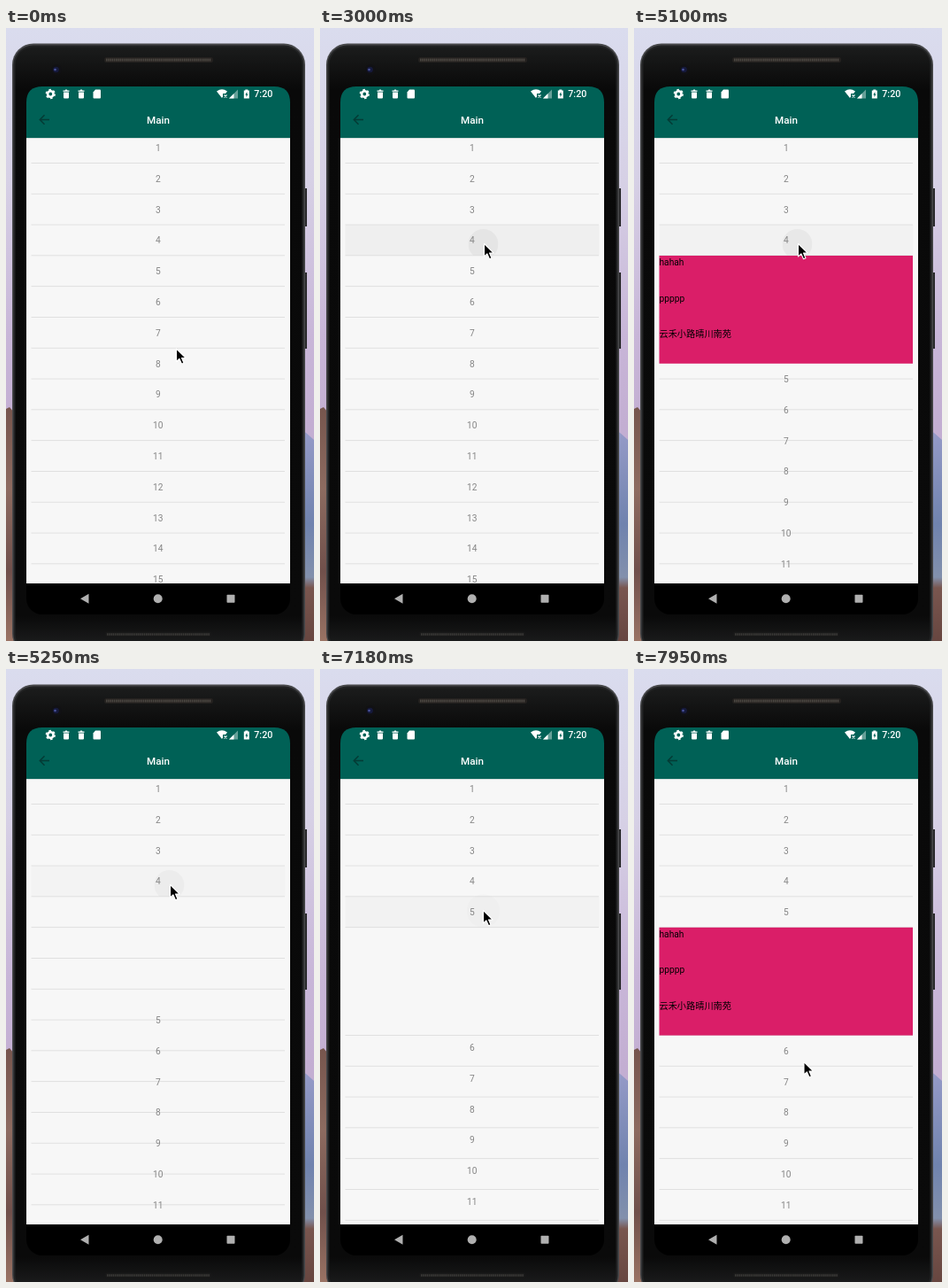
Write an HTML page that moves like this. It is 348 px wide and 692 px high and loops after 8000 ms.

```html
<!DOCTYPE html>
<html lang="zh-CN">
<head>
<meta charset="utf-8">
<style>
  html, body { margin: 0; width: 100%; height: 100%; overflow: hidden; }
  svg { display: block; }
  text { font: 10.2px Roboto, "Noto Sans CJK SC", "Noto Sans CJK", sans-serif; }
  .num { fill: #858585; text-anchor: middle; }
  .bar { fill: #fff; font-weight: 500; }
</style>
</head>
<body>
<svg width="348" height="692" viewBox="0 0 348 692">
  <defs>
    <linearGradient id="sky" x2="0" y2="1">
      <stop offset="0" stop-color="#dadcee"/>
      <stop offset=".25" stop-color="#d6d0e5"/>
      <stop offset=".5" stop-color="#c8b6d8"/>
      <stop offset=".65" stop-color="#c3aed2"/>
    </linearGradient>
    <linearGradient id="rock" x2="0" y2="1">
      <stop offset="0" stop-color="#76554d"/>
      <stop offset=".35" stop-color="#8d6b60"/>
      <stop offset=".7" stop-color="#70504b"/>
      <stop offset="1" stop-color="#9a7364"/>
    </linearGradient>
    <linearGradient id="hills" x2="0" y2="1">
      <stop offset="0" stop-color="#969bc8"/>
      <stop offset=".45" stop-color="#7083ae"/>
      <stop offset=".7" stop-color="#8290ac"/>
      <stop offset=".75" stop-color="#79564f"/>
      <stop offset="1" stop-color="#674640"/>
    </linearGradient>
    <linearGradient id="shell" x2="0" y2="1">
      <stop offset="0" stop-color="#1b1c1c"/>
      <stop offset=".07" stop-color="#090909"/>
      <stop offset=".94" stop-color="#0a0a0a"/>
      <stop offset="1" stop-color="#202122"/>
    </linearGradient>
    <clipPath id="list"><path d="M23 124h298v503H23z"/></clipPath>
    <path id="trash" d="M-3.5-4h2l.8-1h1.4l.8 1h2v1.2h-7zM-3-2h6v6q0 1-1 1h-4q-1 0-1-1z"/>
  </defs>

  <path fill="url(#sky)" d="M0 0h348v692H0z"/>
  <path fill="url(#rock)" d="M0 430l4-2 5 6 8 258H0z"/>
  <path fill="url(#hills)" d="M330 452l9 5 9 8v227h-18z"/>

  <path fill="#29292b" d="M336 181h4v43h-4zM336 276h4v86h-4z"/>
  <rect x="7" y="17.5" width="331" height="690" rx="24" fill="#48494b"/>
  <rect x="8.5" y="19.5" width="328" height="687" rx="22" fill="#222324"/>
  <rect x="10.5" y="21.5" width="324" height="683" rx="20" fill="url(#shell)"/>
  <rect x="111" y="33" width="123" height="6" rx="2.5" fill="#24211f"/>
  <path stroke="#4d4843" stroke-width="3" stroke-dasharray="1.5 .7" d="M113 36h119"/>
  <rect x="112" y="681.5" width="120" height="6" rx="2.5" fill="#191919"/>
  <path stroke="#3c3b39" stroke-width="2.5" stroke-dasharray="1.5 .7" d="M114 684.5h116"/>
  <circle cx="57" cy="47" r="6" fill="#111114"/>
  <circle cx="56.5" cy="47" r="3.3" fill="#161a3c"/>
  <circle cx="55.5" cy="47" r="1.3" fill="#4b549d"/>

  <rect x="23" y="66" width="298" height="596" rx="18"/>
  <path fill="#006156" d="M23 124V84q0-18 18-18h262q18 0 18 18v40z"/>
  <path fill="#f7f7f7" d="M23 124h298v503H23z"/>
  <path fill="#d3dddb" d="M23 124h298v1H23z"/>

  <g fill="#fff">
    <circle cx="50.3" cy="74.5" r="3.2" fill="none" stroke="#fff" stroke-width="2.6"/>
    <circle cx="50.3" cy="74.5" r="4.9" fill="none" stroke="#fff" stroke-width="1.5" stroke-dasharray="2.57"/>
    <use href="#trash" x="68" y="74.5"/>
    <use href="#trash" x="85" y="74.5"/>
    <path d="M101 69.5h5q1 0 1 1v8q0 1-1 1h-6.500q-1 0-1-1V72.500z"/>
    <path d="M238 71.500q6-4.500 12 0l-2 2.500h-3v3.500l-1 1.500z"/>
    <path fill="none" stroke="#fff" stroke-width="1.100" d="M246.500 75.500l3 3m0-3l-3 3"/>
    <path fill-opacity=".4" d="M262 69.500v10h-10z"/>
    <path d="M257.500 74v5.500H252z"/>
    <path fill-rule="evenodd" d="M270.300 69.500h3v1h1.500v9h-6v-9h1.500zM272.300 72l-2 3.500h1.200V78l2-3.500h-1.200z"/>
  </g>
  <text class="bar" x="280.300" y="78.300" style="font-size:10.700px">7:20</text>
  <text class="bar" x="172" y="107.700" text-anchor="middle" style="font-size:11.700px">Main</text>
  <path fill="none" stroke="#043b35" stroke-width="1.500" d="M49 103.500H38.500m5-5.200l-5.200 5.200 5.200 5.200"/>

  <g fill="#b0b0b0">
    <path d="M84 644.300l9.500-5.500v11z"/>
    <circle cx="171.700" cy="644.300" r="5"/>
    <rect x="249.500" y="639.800" width="9" height="9" rx=".7"/>
  </g>

  <g id="rows" clip-path="url(#list)"></g>
  <path id="cursor" stroke="#fff" stroke-width="1.100" stroke-linejoin="round"
    d="M0 0V14.500L3.400 11.400 6 17.300 8.500 16.200 6 10.500H10.700z"/>
</svg>

<script>
const LOOP = 8000, PITCH = 34.8, PANEL = 121.8, ROWS = 15;
// The screen refreshes only at these moments.
const ticks = [0, 1350, 1500, 1950, 3000, 3150, 3300, 3450, 3600, 5100, 5250, 5390, 5540,
  6290, 6440, 6880, 7030, 7180, 7330, 7470, 7950];
const pointer = [[0, 192.5, 362], [1350, 196.5, 339.7], [1500, 192.5, 266.7], [1950, 185.5, 243.5],
  [6290, 185, 252.7], [6440, 184.5, 272.5], [7950, 192, 443.5]];
const presses = [
  { at: 3000, row: 4, y: 244, r: 17, tint: .03 },
  { at: 5100, row: 4, y: 244, r: 17, tint: .018 },
  { at: 6880, row: 5, y: 273, r: 19, tint: .03 }
];

const rowsEl = document.getElementById('rows');
const cursorEl = document.getElementById('cursor');
const clamp = v => Math.max(0, Math.min(1, v));
const ease = v => (1 - Math.cos(Math.PI * clamp(v))) / 2;
const lineY = n => 152 + PITCH * (n - 1);
const line = y => `<rect x="28.500" y="${y}" width="286.500" height=".9" fill="#dedede"/>`;

function press({ at, row, y, r, tint }, t) {
  const age = t - at;
  if (age < 0 || age > 800) return '';
  const top = lineY(row - 1) + 1, bottom = lineY(row);
  const ripple = .045 * clamp(1 - age / 400);
  return `<rect x="28.500" y="${top}" width="287" height="${bottom - top}" opacity="${tint * (1 - age / 800)}"/>
    <circle cx="184.500" cy="${y}" r="${r}" opacity="${ripple}"
      style="clip-path:polygon(0 0,100% 0,100% ${bottom - y + r}px,0 ${bottom - y + r}px)"/>`;
}

function panel(row, opacity) {
  const top = lineY(row) + .6;
  const label = (s, y) => `<text x="28.500" y="${top + y}">${s}</text>`;
  return `<g opacity="${opacity}">
    <rect x="28.500" y="${top}" width="286.500" height="${PANEL}" fill="#da1e68"/>
    ${label('hahah', 11.2)}${label('ppppp', 51.5)}${label('云禾小路晴川南苑', 92)}</g>`;
}

function draw(t) {
  const second = t >= 6880;
  const row = second ? 5 : 4;
  const open = second ? t >= 7030 : t >= 3150 && t < 5100;
  const shift = PANEL * (second ? ease((t - 6958) / 250)
    : ease((t - 3195) / 250) - ease((t - 5283) / 250));
  const opacity = second ? clamp((t - 7230) / 122) : t < 5250 ? clamp((t - 3450) / 120) : 0;

  let lines = open ? line(lineY(row) + PANEL) : '', numbers = '';
  for (let n = 1; n <= ROWS; n++) {
    const below = n > row;
    lines += line(lineY(n) + (below && open ? PANEL : 0));
    numbers += `<text class="num" x="171.800" y="${139 + PITCH * (n - 1) + (below ? shift : 0)}">${n}</text>`;
  }
  rowsEl.innerHTML = lines + presses.map(p => press(p, t)).join('') + numbers
    + (opacity ? panel(row, opacity) : '');

  const [, x, y] = pointer.findLast(p => p[0] <= t);
  cursorEl.setAttribute('transform', `translate(${x} ${y})`);
}

let shown = -1;
function frame() {
  const now = performance.now() % LOOP;
  const t = ticks.findLast(v => v <= now);
  if (t !== shown) draw(shown = t);
  requestAnimationFrame(frame);
}
frame();
</script>
</body>
</html>
```
